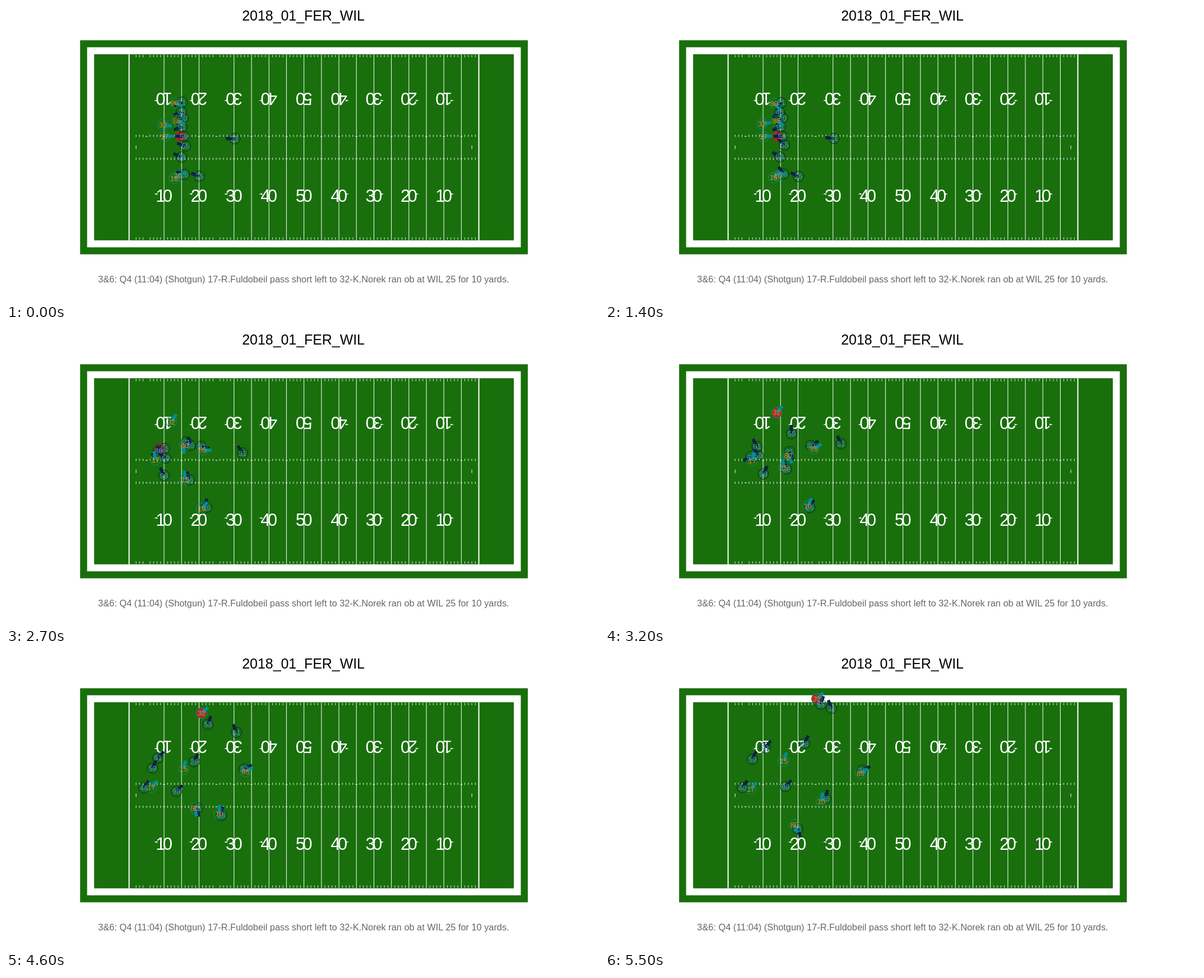
These frames come from a looping animation (1058x529 px, 5.6 s). An HTML page:

```html
<!DOCTYPE html>
<html lang="en">
<head>
<meta charset="utf-8">
<title>Play animation</title>
<style>
  html, body { margin: 0; width: 100%; height: 100%; overflow: hidden; background: #fff; }
  svg { display: block; width: 1058px; height: 529px; }
  text { font-family: "Liberation Sans", Arial, sans-serif; text-anchor: middle; }
</style>
</head>
<body>
<svg viewBox="0 0 1058 529">
  <text x="530.6" y="26" font-size="24.9">2018_01_FER_WIL</text>
  <g id="field"></g>
  <circle id="ball" r="9.6" fill="#a52a2a"/>
  <g id="navy"></g>
  <g id="teal"></g>
  <text x="531" y="494.4" font-size="16.33" fill="#666">3&amp;6: Q4 (11:04) (Shotgun) 17-R.Fuldobeil pass short left to 32-K.Norek ran ob at WIL 25 for 10 yards.</text>
</svg>
<script>
const LOOP = 5600, STEP = 100;
const YARD = 6.24, CX = 531.6, CY = 252.5;
const GRASS = '#196f0c';
const byId = id => document.getElementById(id);
const field = byId('field'), ball = byId('ball');

function el(parent, tag, attrs, text) {
  const node = document.createElementNS('http://www.w3.org/2000/svg', tag);
  for (const k in attrs) node.setAttribute(k, attrs[k]);
  if (text) node.textContent = text;
  parent.appendChild(node);
  return node;
}

const yardX = yd => CX + (yd - 50) * YARD;

// Grass or chalk reaching the given number of yards past the sidelines.
function turf(margin, fill) {
  const w = (120 + 2 * margin) * YARD, h = (53.3 + 2 * margin) * YARD;
  el(field, 'rect', { x: CX - w / 2, y: CY - h / 2, width: w, height: h, fill });
}

// Chalk line around a point given in yards across and pixels from the middle.
const chalk = (yd, dy, w, h) =>
  el(field, 'rect', { x: yardX(yd) - w / 2, y: CY + dy - h / 2, width: w, height: h, fill: '#fff' });

function yardNumber(yd, turn) {
  const g = el(field, 'g', { fill: '#fff', transform: `translate(${yardX(yd)} ${CY}) rotate(${turn})` });
  [...String(Math.min(yd, 100 - yd))].forEach((digit, i) =>
    el(g, 'text', { x: (i * 2 - 1) * YARD, y: 97.6, 'font-size': 31 }, digit));
  if (yd === 50) return;
  const side = Math.sign(yd - 50) * (turn ? -1 : 1);
  el(g, 'path', { d: `M${side * 12} 82L${side * 18} 83.5L${side * 12} 85Z` });
}

function drawField() {
  turf(4, GRASS);
  turf(2, '#fff');
  turf(0, GRASS);
  for (const yd of [0, 100]) chalk(yd, 0, 2, 332.6);
  for (let yd = 10; yd <= 95; yd += 5) if (yd !== 25) chalk(yd, 0, 1, 332.6);
  for (let yd = 2; yd < 100; yd++) {
    if (yd % 5) for (const dy of [-163, -20.5, 20.5, 163]) chalk(yd, dy, 0.9, 4);
    else for (const dy of [-19.5, 20.5]) chalk(yd, dy, 4, 1);
  }
  for (const yd of [2, 98]) chalk(yd, 0, 1, 6);
  for (let yd = 10; yd <= 90; yd += 10) for (const turn of [0, 180]) yardNumber(yd, turn);
}

const TEAMS = {
  navy: { line: '#0c2340', ink: '#4b92db', facing: -1 },
  teal: { line: '#008e97', ink: '#f58220', facing: 1 }
};
const KEYS = [1200, 2700, 3800, 5500];
const players = [];

// A route is the spot at the snap, at the throw, after the catch and at the end.
function player(team, number, ...route) {
  const { line, ink, facing } = TEAMS[team];
  const g = byId(team);
  const p = {
    route, facing,
    bar: el(g, 'path', { d: 'M0 0H15.5', stroke: line, 'stroke-width': 5.5 }),
    ring: el(g, 'circle', { r: 9.5, fill: 'none', stroke: line }),
    label: el(g, 'text', { y: 4.6, 'font-size': 12.8, fill: ink }, number)
  };
  players.push(p);
  return p;
}

player('navy', '21', [314, 172], [322, 200], [338, 243], [344, 312]);
player('navy', '46', [313, 189], [272, 215], [250, 237], [245, 239]);
player('navy', '30', [316, 200], [348, 208], [394, 204], [459, 208]);
player('navy', '91', [314, 216], [283, 212], [263, 201], [286, 167]);
player('navy', '59', [317, 233], [285, 229], [263, 217], [263, 188]);
player('navy', '55', [320, 250], [329, 206], [341, 158], [385, 90]);
player('navy', '98', [313, 270], [282, 260], [290, 253], [322, 237]);
player('navy', '26', [318, 301], [327, 268], [322, 222], [356, 160]);
player('navy', '25', [345, 304], [358, 317], [375, 311], [394, 258]);
player('navy', '31', [408, 237], [422, 220], [417, 177], [404, 97]);
player('teal', '80', [301, 173], [319, 206], [334, 248], [338, 305]);
player('teal', '85', [305, 205], [351, 214], [400, 209], [456, 213]);
player('teal', '15', [300, 308], [320, 267], [316, 222], [319, 191]);
player('teal', '10', [307, 303], [349, 319], [373, 303], [386, 263]);
const runner = player('teal', '32', [280, 212], [295, 164], [324, 129], [378, 80]);
const passer = player('teal', '17', [283, 233], [267, 232], [260, 236], [260, 241]);

const clamp = s => Math.min(1, Math.max(0, s));
const mix = (a, b, s) => a.map((v, k) => v + (b[k] - v) * s);

// Cubic through the route, starting from rest.
function spotAt({ route }, t) {
  t = Math.max(t, KEYS[0]);
  const last = KEYS.length - 1;
  let i = 0;
  while (i < last - 1 && t >= KEYS[i + 1]) i++;
  const span = KEYS[i + 1] - KEYS[i], s = (t - KEYS[i]) / span;
  const slope = (j, k) => {
    if (j === 0) return 0;
    const n = Math.min(j + 1, last);
    return (route[n][k] - route[j - 1][k]) / (KEYS[n] - KEYS[j - 1]);
  };
  const s2 = s * s, s3 = s2 * s;
  return [0, 1].map(k => {
    const a = route[i][k], b = route[i + 1][k];
    return a + (b - a) * (3 * s2 - 2 * s3)
      + span * (slope(i, k) * (s3 - 2 * s2 + s) + slope(i + 1, k) * (s3 - s2));
  });
}

// Snapped to the passer, then thrown to the runner, who carries it.
function ballAt(t) {
  const held = mix([311, 233], spotAt(passer, t), clamp((t - 1300) / 950));
  return mix(held, spotAt(runner, t), clamp((t - 2500) / 700));
}

// Players turn to where they run and to the ball; before the throw also to the other side.
function heading(p, t, [x, y], [bx, by]) {
  const [x0, y0] = spotAt(p, t - 50), [x1, y1] = spotAt(p, t + 50);
  const far = Math.hypot(bx - x, by - y) + 4, look = 20;
  const stance = 40 * Math.max(0, 1 - t / KEYS[1]) * p.facing;
  const vx = (x1 - x0) * 10 + look * (bx - x) / far + stance;
  const vy = (y1 - y0) * 10 + look * (by - y) / far;
  return Math.atan2(vy, vx) * 180 / Math.PI;
}

function draw() {
  const t = Math.floor((performance.now() % LOOP) / STEP) * STEP;
  const b = ballAt(t);
  ball.setAttribute('transform', `translate(${b})`);
  for (const p of players) {
    const spot = spotAt(p, t), at = `translate(${spot})`;
    p.bar.setAttribute('transform', `${at} rotate(${heading(p, t, spot, b)})`);
    p.ring.setAttribute('transform', at);
    p.label.setAttribute('transform', at);
  }
  requestAnimationFrame(draw);
}

// Stack each team as bars, then rings, then numbers.
function layer(team) {
  const g = byId(team);
  for (const tag of ['path', 'circle', 'text']) g.append(...g.querySelectorAll(tag));
}

drawField();
layer('navy');
layer('teal');
draw();
</script>
</body>
</html>
```
